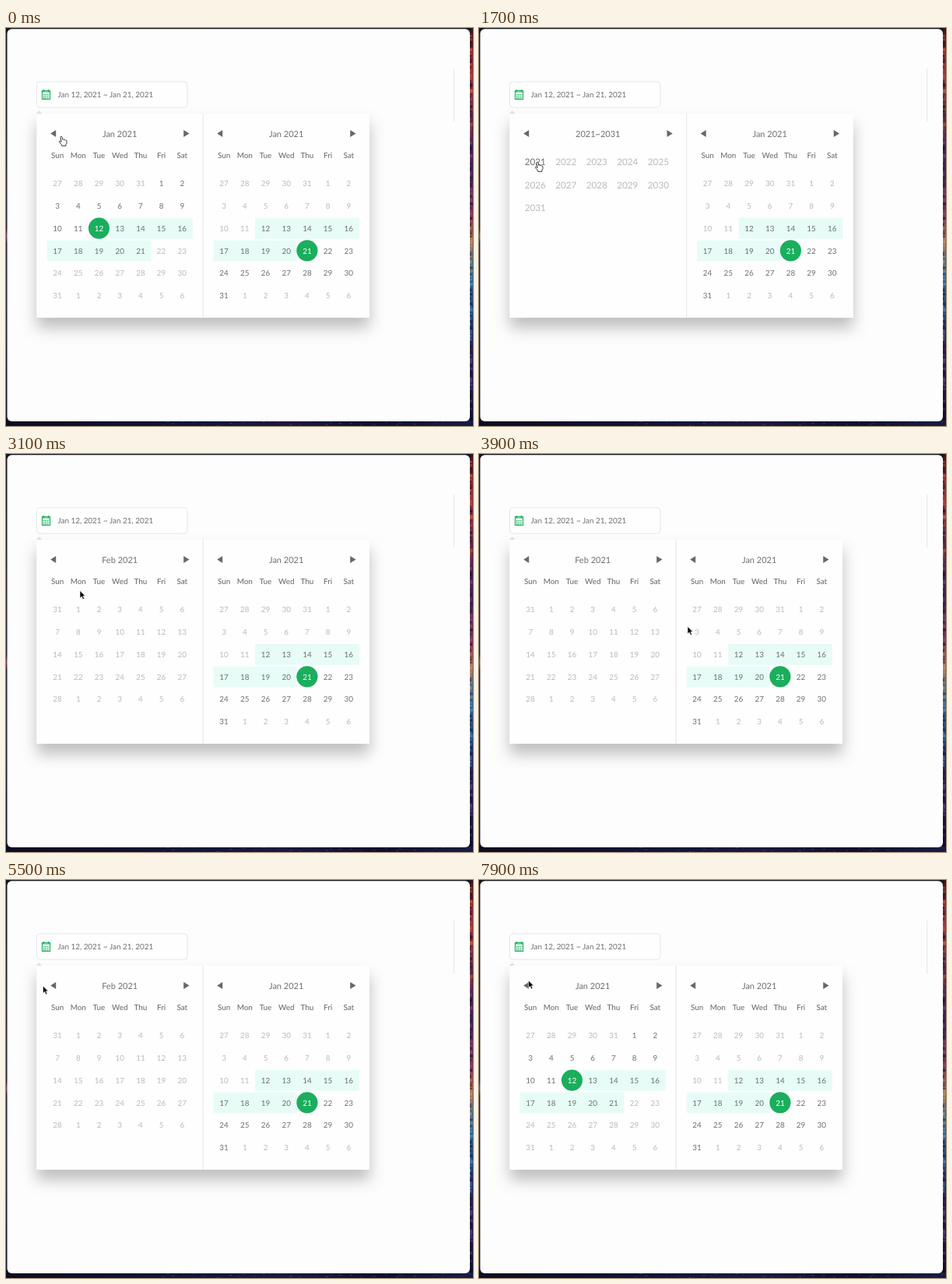
These frames come from a looping animation (600x511 px, 8000 ms). An HTML page:

```html
<!DOCTYPE html>
<html lang="en">
<head>
<meta charset="utf-8">
<title>Date range picker</title>
<style>
html, body { margin: 0; width: 100%; height: 100%; overflow: hidden; background: #fff; }
svg { display: block; width: 600px; height: 511px; }
text { font-family: Lato, "Open Sans", sans-serif; font-size: 9.9px; fill: #6d6f72; text-rendering: geometricPrecision; }
.mid { text-anchor: middle; }
.off { fill: #b8babc; }
.on { fill: #fff; }
.week { font-weight: 500; }
.title { font-size: 11px; }
.year { font-size: 11.7px; }
</style>
</head>
<body>
<svg viewBox="0 0 600 511">
  <defs>
    <linearGradient id="edge" x2="0" y2="1">
      <stop offset="0" stop-color="#3a1218"/>
      <stop offset=".07" stop-color="#8f2f35"/>
      <stop offset=".16" stop-color="#8c3a45"/>
      <stop offset=".24" stop-color="#4f2444"/>
      <stop offset=".36" stop-color="#3b2450"/>
      <stop offset=".48" stop-color="#7d3853"/>
      <stop offset=".53" stop-color="#a8694f"/>
      <stop offset=".6" stop-color="#3f6a86"/>
      <stop offset=".72" stop-color="#254575"/>
      <stop offset=".82" stop-color="#2c2049"/>
      <stop offset="1" stop-color="#10122e"/>
    </linearGradient>
    <linearGradient id="left" x2="0" y2="1">
      <stop offset="0" stop-color="#17151d"/>
      <stop offset=".51" stop-color="#221c2b"/>
      <stop offset=".53" stop-color="#864355"/>
      <stop offset=".55" stop-color="#231e33"/>
      <stop offset="1" stop-color="#11142c"/>
    </linearGradient>
    <linearGradient id="floor">
      <stop offset="0" stop-color="#0b0d20"/>
      <stop offset=".45" stop-color="#13163a"/>
      <stop offset=".6" stop-color="#1c1840"/>
      <stop offset=".8" stop-color="#0e112a"/>
      <stop offset="1" stop-color="#1a1b42"/>
    </linearGradient>
    <filter id="shadow" x="-15%" y="-15%" width="130%" height="140%">
      <feDropShadow dx="0" dy="13" stdDeviation="9.5" flood-color="#000" flood-opacity=".25"/>
    </filter>
  </defs>

  <rect width="600" height="511" fill="url(#floor)"/>
  <rect width="4" height="504" fill="url(#left)"/>
  <rect x="592" width="8" height="504" fill="url(#edge)"/>
  <g id="specks"></g>
  <rect width="597" height="4" fill="#17171b"/>
  <rect x="1.5" y="1.2" width="594.5" height="503.8" rx="6" fill="#fefdfe"/>
  <path d="M575.5 52V120" stroke="#e5e5e7"/>

  <rect x="39.5" y="69" width="193.5" height="33" rx="4" fill="#fefefe" stroke="#e6e7e9"/>
  <g fill="none" stroke="#1caf5f">
    <path d="M46.5 80.5h10v11h-10zM46 82h11" stroke-width="1.2"/>
    <path d="M48.5 79v3M54.5 79v3" stroke-width="1.4"/>
    <path d="M48 85.5h7.5M48 87.8h7.5M48 90h7.5" stroke-width="1.3" stroke-dasharray="1.5 1"/>
  </g>
  <text x="66.5" y="89.2">Jan 12, 2021 ~ Jan 21, 2021</text>
  <path d="M38.5 110L42.5 106L46.5 110z" fill="#e4e4e6"/>

  <rect id="panel" x="39.5" y="110" height="262" fill="#fefefe" filter="url(#shadow)"/>
  <g id="content"></g>
  <g id="cursor">
    <path id="arrow" d="M0 0V9.4L2.2 7.4L3.8 11L5.5 10.2L3.9 6.8H6.8z"
      fill="#050505" stroke="#fff" stroke-width=".6"/>
    <path id="hand" d="M-1.2 .9C-1.2 -.3 .9 -.4 1.1 .8L1.8 4.1C2.5 3.3 3.4 3.6 3.6 4.3C4.3 3.7 5.2 4 5.4 4.8C6.1 4.4 6.8 4.9 6.9 5.7L7 8.2L5.9 10.3V12H.8L.5 10.7L-2.6 7.2C-3.3 6.2 -2 5.5 -1.1 6.3L.1 7.1z"
      fill="#fff" stroke="#222" stroke-width=".9" stroke-linejoin="round"/>
  </g>
</svg>
<script>
const LOOP = 8000;
const COL = 26.7, ROW = 28.75, CALENDAR = 213.7;
const WEEK = ['Sun', 'Mon', 'Tue', 'Wed', 'Thu', 'Fri', 'Sat'];
const $ = id => document.getElementById(id);

// Seeded mottling for the wallpaper around the window
function specks() {
  let seed = 7, out = '';
  const rnd = () => (seed = seed * 16807 % 2147483647) / 2147483647;
  const speck = (x, y, w, h, fill, alpha) =>
    `<rect x="${x}" y="${y}" width="${w}" height="${h}" fill="${fill}" opacity="${alpha}"/>`;
  for (let y = 4; y < 504; y += 2 + rnd() * 4) {
    const light = y < 130 ? '#e0603c' : y < 250 ? '#a04880' : y < 310 ? '#e8a860' : y < 400 ? '#5aa0d0' : '#7050a0';
    out += speck(596, y, 1 + rnd() * 3, 1 + rnd() * 4, rnd() < .5 ? '#100c20' : light, .25 + rnd() * .4);
  }
  for (let x = 200; x < 600; x += 3 + rnd() * 14) {
    out += speck(x, 505 + rnd() * 5, 1 + rnd() * 4, 1, '#58508c', .2 + rnd() * .4);
  }
  return out;
}

const label = (x, y, str, cls = '') => `<text class="mid ${cls}" x="${x}" y="${y + 3.6}">${str}</text>`;
const tint = (x, y) =>
  `<rect x="${x - COL / 2}" y="${y - 13.3}" width="${COL + .2}" height="26.8" fill="#e7fcf6"/>`;

function header(left, width, title) {
  const a = left + 17.7, b = left + width - 17.7;
  return `<path d="M${a} 135.5l7-4.6v9.2zM${b} 135.5l-7.3-4.6v9.2z" fill="#66686a"/>` +
    label(left + width / 2 - .2, 136.7, title, 'title');
}

// first: column of day 1; prev: length of the month before; active: selectable day range
function month(left, { title, first, days, prev, rows, active, picked, range }) {
  const x = i => left + 26.6 + (i % 7) * COL;
  const y = i => 199.7 + Math.floor(i / 7) * ROW;
  let back = '', out = header(left, CALENDAR, title);
  WEEK.forEach((d, i) => out += label(x(i), 163.8, d, 'week'));
  for (let i = 0; i < rows * 7; i++) {
    const day = i - first + 1;
    const shown = day < 1 ? prev + day : day > days ? day - days : day;
    if (range && day >= range[0] && day <= range[1]) back += tint(x(i), y(i));
    if (day === picked) back += `<circle cx="${x(i)}" cy="${y(i) - .1}" r="13.6" fill="#1aae5d"/>`;
    const live = active && day >= active[0] && day <= active[1];
    out += label(x(i), y(i), shown, day === picked ? 'on' : live ? '' : 'off');
  }
  return back + out;
}

function years(left) {
  let out = header(left, 227, '2021~2031');
  for (let i = 0; i < 11; i++) {
    out += label(left + 32.7 + (i % 5) * 39.55, 172.6 + Math.floor(i / 5) * 29.3, 2021 + i, i ? 'year off' : 'year');
  }
  return out;
}

const jan = { title: 'Jan 2021', first: 5, days: 31, prev: 31, rows: 6 };
const start = { ...jan, active: [1, 21], picked: 12, range: [13, 21] };
const end = { ...jan, active: [12, 31], picked: 21, range: [12, 20] };
const feb = { title: 'Feb 2021', first: 1, days: 28, prev: 31, rows: 5 };

function render(view) {
  const width = view === 'years' ? 227.2 : CALENDAR;
  const split = 39.5 + width;
  const first = view === 'years' ? years(39.5) : month(39.5, view === 'feb' ? feb : start);
  $('panel').setAttribute('width', width + CALENDAR);
  $('content').innerHTML = `<path d="M${split} 110V372" stroke="#e4e4e6"/>` + first + month(split + .3, end);
}

const views = [[0, 'jan'], [900, 'years'], [2300, 'feb'], [7100, 'jan']];
const pointers = [[0, 'hand'], [2600, 'arrow'], [6100, 'hand'], [7500, 'arrow']];
// time, x, y of the pointer tip
const path = [
  [0, 71, 139.3], [500, 144, 136], [900, 144, 136], [1500, 75, 172.3], [1800, 75, 172.3],
  [2100, 95, 174], [3100, 95, 175.5], [3900, 268, 221.5], [4700, 150, 170], [5500, 47.5, 136],
  [6200, 60, 136.3], [7200, 60, 136.3], [7900, 63.5, 129], [8000, 63.5, 129]
];

const stepAt = (list, t) => list.filter(s => s[0] <= t).pop()[1];

function pointAt(t) {
  const i = path.findIndex(p => p[0] > t);
  const [a, b] = [path[i - 1], path[i]];
  const k = (t - a[0]) / (b[0] - a[0]);
  const e = k * k * (3 - 2 * k);
  return [a[1] + (b[1] - a[1]) * e, a[2] + (b[2] - a[2]) * e];
}

let current;
function draw(t) {
  const view = stepAt(views, t);
  if (view !== current) render(current = view);
  const shape = stepAt(pointers, t);
  for (const id of ['arrow', 'hand']) $(id).style.display = id === shape ? '' : 'none';
  $('cursor').setAttribute('transform', `translate(${pointAt(t)})`);
}

$('specks').innerHTML = specks();
const origin = performance.now();
function tick() {
  draw(Math.floor((performance.now() - origin) % LOOP / 100) * 100);
  requestAnimationFrame(tick);
}
tick();
</script>
</body>
</html>
```
